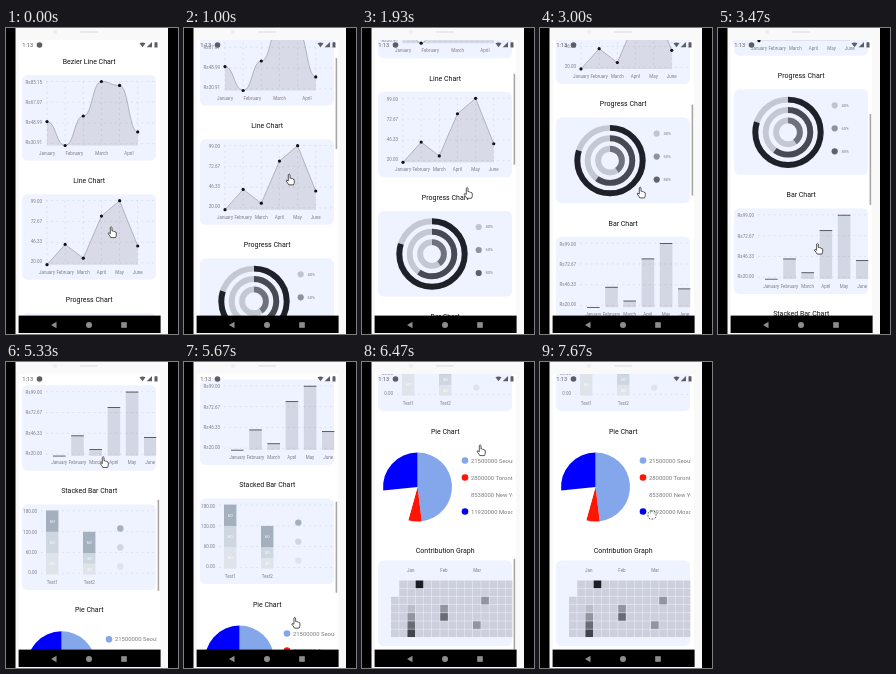
Write an HTML page that moves like this. It is 172 px wide and 306 px high and loops after 7.79 s.

```html
<!DOCTYPE html>
<html lang="en">
<head>
<meta charset="utf-8">
<title>Chart gallery</title>
<style>
  html, body { margin: 0; width: 100%; height: 100%; overflow: hidden; background: #000; }
  svg { display: block; width: 100vw; height: 100vh; }
  text { font-family: Roboto, Arial, sans-serif; }
  .title { font-size: 7px; text-anchor: middle; fill: #111; }
  .label { font-size: 4.5px; fill: #7c7d86; }
  .mid { text-anchor: middle; }
  .end { text-anchor: end; }
  .grid { stroke: #1c1e26; stroke-opacity: .2; stroke-width: .45; stroke-dasharray: 1.8 3.5; fill: none; }
</style>
</head>
<body>
<svg viewBox="0 0 172 306">
  <defs>
    <clipPath id="screen"><rect x="13" y="12" width="141" height="276"/></clipPath>
    <clipPath id="column"><rect x="16" y="0" width="134.5" height="860"/></clipPath>
  </defs>
  <rect width="172" height="306"/>
  <rect x="9.5" y="-8" width="152.5" height="330" fill="#f9f9fa"/>
  <circle cx="49" cy="4" r="2.2" fill="#efeff1"/>
  <rect x="74" y="3" width="18" height="2" rx="1" fill="#e9e9ec"/>
  <rect x="13" y="12" width="141" height="276" fill="#fff"/>
  <g clip-path="url(#screen)">
    <g id="content"><g id="charts" clip-path="url(#column)"></g></g>
    <rect id="thumb" x="151.6" width="1.6" height="91" fill="#a6a6a6"/>
  </g>
  <g fill="#5c5e64">
    <text x="16.3" y="19" font-size="5.7">1:13</text>
    <circle cx="33.5" cy="17" r="2.8"/>
    <path d="M133.5 15.2Q136.5 13.6 139.5 15.2L136.5 19.3ZM146 14V19.3H140.7ZM148.5 14.6H149.4V14H150.6V14.6H151.5V19.4H148.5Z"/>
  </g>
  <rect x="12.6" y="287.6" width="142" height="17.4"/>
  <g fill="#8d8d8d">
    <path d="M45 297L50.5 293.8V300.2Z"/>
    <circle cx="83" cy="297" r="3"/>
    <rect x="115.2" y="294.2" width="5.6" height="5.6"/>
  </g>
  <g id="cursor" stroke="#111" stroke-width=".7" stroke-linejoin="round">
    <path id="hand" fill="#fff" d="M-1.7 -4.5Q-.9 -6 0 -4.5V-1Q1 -1.7 1.5 -.6Q2.6 -1.1 3 0Q4.3 -.3 4.3 1V3Q4.2 4.2 3.5 5.6H-1.2Q-2 3.9 -4 1.5Q-3.4 .1 -1.7 1.7Z"/>
    <rect id="fist" x="-4" y="-4" width="8" height="8" rx="3" fill="none" stroke-dasharray="1.8 1.4"/>
  </g>
</svg>
<script>
const LOOP = 7790, INK = '#1c1e26', CARD = '#eff2ff', PITCH = 119.15;
const $ = id => document.getElementById(id);
const months = ['January', 'February', 'March', 'April', 'May', 'June'];
const rates = [51.2, 30.91, 55.9, 85.15, 81.8, 42.4];
const sales = [20, 45, 28, 80, 99, 43];

const each = (list, draw) => list.map(draw).join('');
const mix = (a, b, k) => a + (b - a) * k;
const clamp = k => Math.min(1, Math.max(0, k));
const title = (s, y) => `<text class="title" x="83.2" y="${y + 2.5}">${s}</text>`;
const card = y => `<rect x="16" y="${y}" width="134" height="85.5" rx="5.5" fill="${CARD}"/>`;
const label = (s, x, y, align = 'mid') => `<text class="label ${align}" x="${x}" y="${y + 1.6}">${s}</text>`;
const rect = (x, y, w, h, fill, alpha = 1) =>
  `<rect x="${x}" y="${y}" width="${w}" height="${h}" fill="${fill}" fill-opacity="${alpha}"/>`;
const dot = (x, y, r, fill, alpha = 1) =>
  `<circle cx="${x}" cy="${y}" r="${r}" fill="${fill}" fill-opacity="${alpha}"/>`;

const column = i => 41 + i * 18.15;
const base = top => top + 70.5;

function levels(top, data) {
  const min = Math.min(...data), max = Math.max(...data);
  return data.map(v => base(top) - 64 * (v - min) / (max - min));
}

function axis(top, data, prefix = '', right = 36) {
  const min = Math.min(...data), max = Math.max(...data);
  return each([0, 1, 2, 3], i =>
    `<path class="grid" d="M${right + 4} ${top + 6.4 + i * 20.8}H150"/>` +
    label(prefix + mix(max, min, i / 3).toFixed(2), right, top + 7.4 + i * 20.1, 'end'));
}

function areaChart(top, data, prefix, names, step, segment) {
  const points = levels(top, data).map((y, i) => [column(i), y]);
  const line = each(points, (p, i) => i ? segment(points[i - 1], p) : 'M' + p);
  return card(top) + axis(top, data, prefix) +
    each(points, ([x]) => `<path class="grid" d="M${x} ${top + 6.4}V${base(top)}"/>`) +
    `<path d="${line}V${base(top)}H${column(0)}Z" fill="${INK}" fill-opacity=".11"/>` +
    `<path d="${line}" fill="none" stroke="${INK}" stroke-opacity=".25"/>` +
    each(points, ([x, y]) => dot(x, y, 1.6, '#111')) +
    each(names, (s, i) => label(s, column(0) + i * step, top + 78));
}

const straight = (a, b) => 'L' + b;
function smooth([ax, ay], [bx, by]) {
  const m = (ax + bx) / 2;
  return `C${m} ${ay} ${m} ${by} ${bx} ${by}`;
}

function progressChart(top) {
  const cx = 70, cy = top + 43;
  return card(top) + each([.4, .6, .8], (v, i) => {
    const ring = (alpha, part) => `<circle cx="${cx}" cy="${cy}" r="${11.9 + i * 10.4}" fill="none"
      stroke="${INK}" stroke-opacity="${alpha}" stroke-width="5.9" pathLength="100"
      stroke-dasharray="${part * 100} 100" transform="rotate(-90 ${cx} ${cy})"/>`;
    const y = top + 16 + i * 23;
    return ring(.2, 1) + ring(.5 + i * .24, v) + dot(116.7, y, 3.1, INK, .22 + i * .23) +
      `<text class="label" x="123.5" y="${y + 1.4}" style="font-size:4px">${v * 100}%</text>`;
  });
}

function barChart(top) {
  return card(top) + axis(top, sales, 'Rs') +
    each(levels(top, sales), (y, i) => {
      const x = 47 + i * 18.2;
      return rect(x, y, 12.6, base(top) - y, INK, .13) + rect(x, y - .2, 12.6, .9, INK, .75) +
        label(months[i], x + 6.2, top + 77.5);
    });
}

function stackedChart(top) {
  const shades = ['#dfe4ea', '#ced6e0', '#a4b0be'];
  const stacks = each([[60, 60, 60], [30, 30, 60]], (parts, i) => {
    const x = 40 + i * 37;
    let y = top + 70;
    return each(parts, (v, k) => {
      const h = v * 64 / 180;
      y -= h;
      return rect(x, y, 12.4, h, shades[k]) +
        `<text x="${x + 6.2}" y="${y + h / 2 + 1.5}" font-size="4.3" text-anchor="middle" fill="#fff">${v}</text>`;
    }) + label('Test' + (i + 1), x + 6.3, top + 77.5);
  });
  return card(top) + axis(top, [180, 0], '', 31) + stacks +
    each(shades, (fill, i) => dot(114.3, top + 62 - i * 19, 3.2, fill));
}

function pieChart(cx, cy, r) {
  const cities = [[21500000, 'Seoul', '#83a7ea'], [2800000, 'Toronto', '#fc1605'],
    [8538000, 'New York', '#fff'], [11920000, 'Moscow', '#00f']];
  const total = cities.reduce((sum, c) => sum + c[0], 0);
  let angle = 0;
  const edge = () => `${cx + r * Math.sin(angle)} ${cy - r * Math.cos(angle)}`;
  return each(cities, ([n, name, fill], i) => {
    const from = edge(), y = cy - 26.5 + i * 17;
    angle += n / total * Math.PI * 2;
    return `<path d="M${cx} ${cy}L${from}A${r} ${r} 0 0 1 ${edge()}Z" fill="${fill}"/>` +
      dot(103, y, 3.3, fill) +
      `<text x="109" y="${y + 2.1}" font-size="5.9" fill="#7a7a7a">${n} ${name}</text>`;
  });
}

// Two growing streaks and two single days.
function commits(day) {
  if (day > 16 && day < 22) return day - 16;
  if (day === 45 || day === 46) return day - 43;
  return day === 75 || day === 79 ? 2 : 0;
}

function contributionGraph(top) {
  let out = card(top) + each(['Jan', 'Feb', 'Mar'], (s, i) => label(s, 48.7 + i * 33.2, top + 10));
  for (let day = 2; day < 105; day++) {
    const n = commits(day);
    out += rect(29 + Math.floor(day / 7) * 8.2, top + 20 + day % 7 * 8.15, 7.7, 7.65, INK,
      n ? .06 + n * .19 : .16);
  }
  return out;
}

$('charts').innerHTML =
  each(['Bezier Line Chart', 'Line Chart', 'Progress Chart', 'Bar Chart', 'Stacked Bar Chart',
    'Pie Chart', 'Contribution Graph'], (s, i) => title(s, 33.3 + i * PITCH)) +
  areaChart(47, rates, 'Rs', months.slice(0, 4), 27.3, smooth) +
  areaChart(47 + PITCH, sales, '', months, 18.15, straight) +
  progressChart(47 + 2 * PITCH) + barChart(47 + 3 * PITCH) + stackedChart(47 + 4 * PITCH) +
  pieChart(55.5, 685, 34.5) + contributionGraph(758.5);

// Each stop is [start, end, x, fromY, toY]; the page follows the hand, and fromY = toY only hovers.
const stops = [
  [200, 950, 106, 204, 149], [1400, 2130, 106, 212, 147], [2580, 2620, 100, 294, 294],
  [2870, 3050, 101, 240, 136], [3750, 4230, 100, 266, 165], [4670, 5400, 98, 156, 94],
  [5700, 6200, 112, 265, 92], [6420, 6520, 119, 88, 88], [7200, 7300, 75, 294, 294],
  [7670, LOOP, 112, 153, 153]
];

function pose(t) {
  let scroll = 0, lastMove = -LOOP, [, , x, y] = stops[0], left = 0;
  for (const [start, end, stopX, from, to] of stops) {
    if (t < start) {
      const k = clamp((t - left) / (start - left)), ease = k * k * (3 - 2 * k);
      return { scroll, x: mix(x, stopX, ease), y: mix(y, from, ease), idle: t - lastMove };
    }
    const k = clamp((t - start) / (end - start));
    scroll += (from - to) * k;
    x = stopX;
    y = mix(from, to, k);
    left = end;
    if (from !== to) lastMove = Math.min(t, end);
    if (t < end) break;
  }
  return { scroll, x, y, idle: t - lastMove };
}

function render(t) {
  const { scroll, x, y, idle } = pose(t);
  $('content').setAttribute('transform', `translate(0 ${-scroll})`);
  $('thumb').setAttribute('y', 12 + scroll * .33);
  $('thumb').setAttribute('opacity', 1 - clamp((idle - 450) / 300));
  $('cursor').setAttribute('transform', `translate(${x} ${y})`);
  const gripping = t >= 7670;
  $('hand').setAttribute('visibility', gripping ? 'hidden' : 'visible');
  $('fist').setAttribute('visibility', gripping ? 'visible' : 'hidden');
}

const start = performance.now();
function frame() {
  render((performance.now() - start) % LOOP);
  requestAnimationFrame(frame);
}
frame();
</script>
</body>
</html>
```
